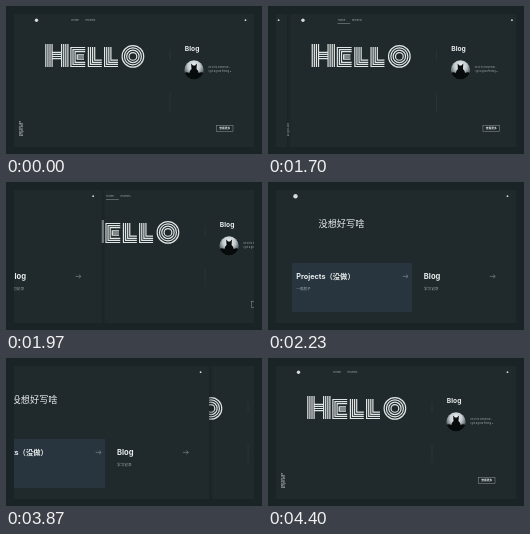
These frames come from a looping animation (256 px wide and 148 px high, 4630 ms). An HTML page:

```html
<!DOCTYPE html>
<html lang="zh">
<head>
<meta charset="utf-8">
<title>Portfolio page slide</title>
<style>
  html, body { margin: 0; width: 100%; height: 100%; overflow: hidden; background: #1a2427; }
  svg { display: block; width: 100vw; height: 100vh; }
  text { font-family: Inter, "Noto Sans CJK SC", "Noto Sans CJK", "Noto Sans", sans-serif; fill: #e9edee; }
  .bold { font-weight: 700; }
  .dim { fill: #a5afb1; }
  .line { fill: none; stroke: #dfe4e4; stroke-width: 1.2; }
  .arrow { fill: none; stroke: #8f9a9d; stroke-width: .55; }
  .panel { fill: #20292c; }
  .dot { fill: #d5dbdd; }
</style>
</head>
<body>
<svg viewBox="0 0 256 148">
  <defs>
    <clipPath id="frame"><rect x="8" y="8" width="240" height="133"/></clipPath>
    <clipPath id="round"><circle cx="188" cy="64" r="9.7"/></clipPath>
    <radialGradient id="sky" cx=".5" cy=".3" r=".55">
      <stop offset="0" stop-color="#f4f6f6"/>
      <stop offset=".55" stop-color="#c3cbce"/>
      <stop offset="1" stop-color="#4d5a5f"/>
    </radialGradient>
    <linearGradient id="shade">
      <stop offset="0" stop-color="#10171a" stop-opacity=".35"/>
      <stop offset="1" stop-color="#10171a" stop-opacity="0"/>
    </linearGradient>
    <path id="arrow" class="arrow" d="M0 0H5.4M3.4 -1.9L5.4 0L3.4 1.9"/>
  </defs>

  <g clip-path="url(#frame)">
    <rect class="panel" x="8" y="8" width="240" height="133"/>

    <g id="home">
      <circle class="dot" cx="30.5" cy="14.2" r="1.7"/>
      <circle class="dot" cx="239.5" cy="14.2" r=".9"/>
      <text class="dim" x="65.3" y="15.2" font-size="2.7">Home</text>
      <text class="dim" x="79.5" y="15.2" font-size="2.6">Projects</text>
      <rect id="underline" x="65" y="17.2" width="0" height=".6" fill="#7f8b8f"/>
      <path id="hello" class="line"/>
      <path d="M164 44V54M164 87V105" stroke="#354146" stroke-width=".5"/>
      <text class="bold" x="178.8" y="44.8" font-size="6.7">Blog</text>
      <g clip-path="url(#round)">
        <rect x="178" y="54" width="20" height="20" fill="url(#sky)"/>
        <path d="M178 67Q181 65.5 183.4 67Q183.6 64.5 185.5 63L185.1 57.4L187 59.4H189L190.9 57.4L190.5 63Q192.4 64.5 192.6 67Q195 65.5 198 67V74H178Z" fill="#080b0c"/>
      </g>
      <text class="dim" x="202.3" y="62.4" font-size="2.3">oh hi it’s tomorrow –</text>
      <text class="dim" x="202.3" y="66.4" font-size="2.3">i got a good feeling ~</text>
      <rect x="210.5" y="119.4" width="16.5" height="6" fill="none" stroke="#8f9a9d" stroke-width=".5"/>
      <text class="bold" x="218.8" y="123.4" font-size="2.8" text-anchor="middle">查看更多</text>
      <g font-size="2.1">
        <text transform="translate(14.7 130) rotate(-90)">made with care</text>
        <text transform="translate(16.8 130) rotate(-90)">all rights kept</text>
      </g>
    </g>

    <g id="list">
      <rect class="panel" x="8" y="8" width="240" height="133"/>
      <rect x="248" y="8" width="5" height="133" fill="url(#shade)"/>
      <circle class="dot" cx="27.5" cy="14.2" r="2.2"/>
      <circle class="dot" cx="239.5" cy="14.2" r=".9"/>
      <text x="50.5" y="45.4" font-size="9.2">没想好写啥</text>
      <rect x="24" y="81" width="120" height="49" fill="#28353e"/>
      <text class="bold" x="28.2" y="97" font-size="7.3">Projects<tspan>（没做）</tspan></text>
      <text class="dim" x="28.3" y="107.6" font-size="3.6">一般般子</text>
      <text class="bold" x="155.8" y="97" font-size="7.6">Blog</text>
      <text class="dim" x="156" y="107.6" font-size="3.6">学习记录</text>
      <use href="#arrow" x="134.6" y="94.4"/>
      <use href="#arrow" x="221.8" y="94.4"/>
    </g>
  </g>
</svg>
<script>
const LOOP = 4630, WIDTH = 240, PARALLAX = 0.4, GAP = 2.1;
const $ = id => document.getElementById(id);
const clamp = v => Math.min(1, Math.max(0, v));
const span = (t, from, to) => clamp((t - from) / (to - from));
const repeat = (n, f) => Array.from({ length: n }, (_, i) => f(i * GAP)).join('');

// Inline lettering made of parallel strokes
const letterH = repeat(4, d => `M${39.8 + d} 38V61M${55.6 + d} 38V61`)
  + repeat(4, d => `M46 ${46.3 + d}H55.6`);
const letterE = repeat(3, d => `M79.2 ${41.5 + d}H${64.9 + d}V${60.5 - d}H79.2M71.2 ${48.9 + d}H78`)
  + 'M71.2 48.3V53.7';
const letterL = x => repeat(4, d => `M${x + d} 41V${60.5 - d}H${x + 13.4}`);
const letterO = repeat(4, d => {
  const r = 10.8 - d * 1.1;
  return `M${126.9 - r} 50.4a${r} ${r} 0 1 0 ${2 * r} 0a${r} ${r} 0 1 0 ${-2 * r} 0`;
});
$('hello').setAttribute('d', letterH + letterE + letterL(82.4) + letterL(98.6) + letterO);

// Share of the stage covered by the list page
function cover(t) {
  if (t < 3567) return span(t, 1530, 2230) ** 2.18;
  if (t < 4100) return 1 - 0.575 * span(t, 3567, 4100) ** 2;
  return 0.425 * (1 - span(t, 4100, 4400)) ** 1.5;
}

function draw(t) {
  const p = cover(t);
  $('home').setAttribute('transform', `translate(${WIDTH * PARALLAX * p} 0)`);
  $('list').setAttribute('transform', `translate(${WIDTH * (p - 1)} 0)`);
  $('list').setAttribute('visibility', p > 0 ? 'visible' : 'hidden');
  const u = t < 3000 ? span(t, 310, 600) : 0;
  $('underline').setAttribute('width', 12.8 * u * u * (3 - 2 * u));
}

const start = performance.now();
function tick() {
  draw((performance.now() - start) % LOOP);
  requestAnimationFrame(tick);
}
tick();
</script>
</body>
</html>
```
